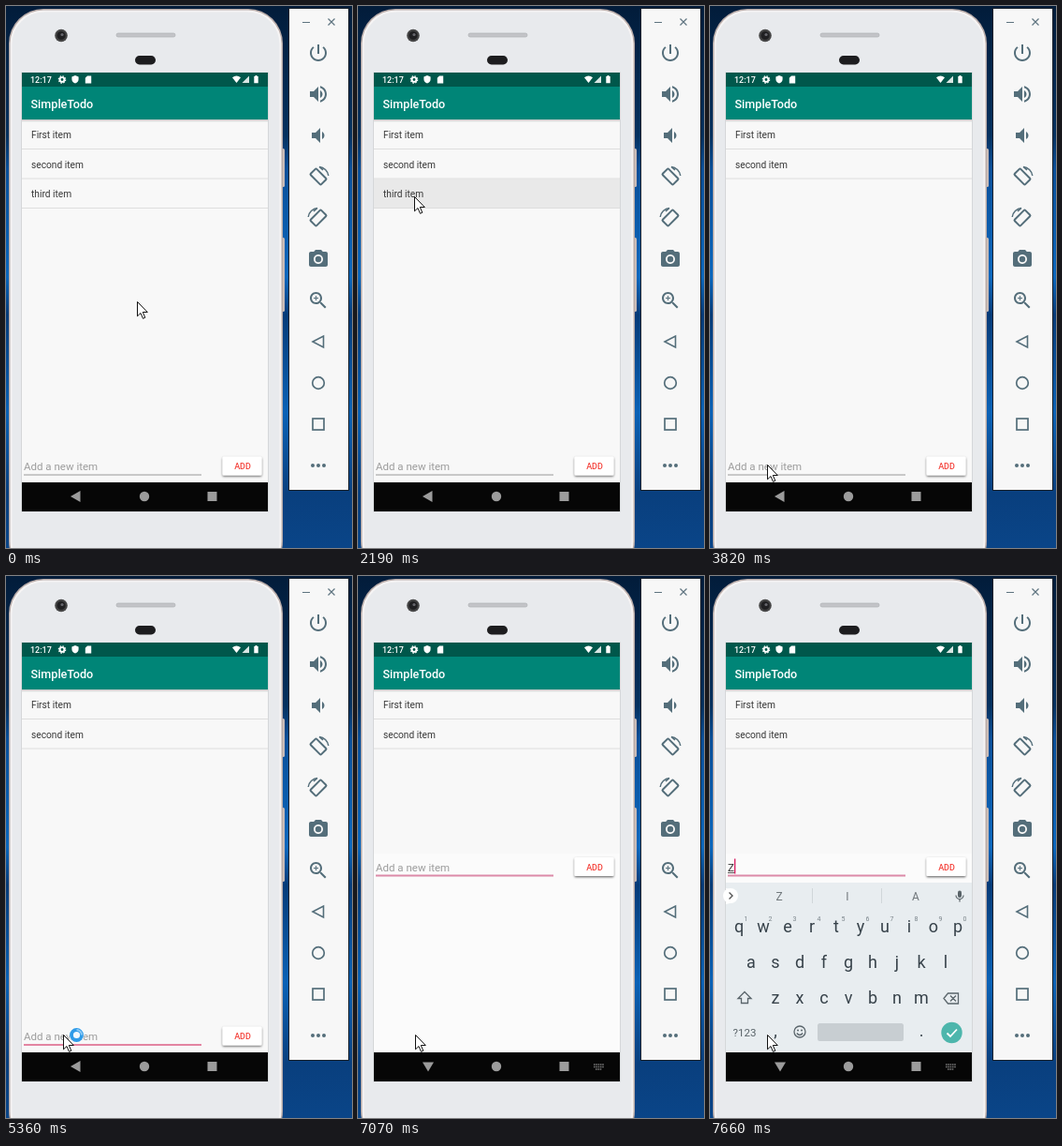
An HTML page for the animation above (8000 ms loop, 370x578 px).

```html
<!DOCTYPE html>
<html lang="en">
<head>
<meta charset="utf-8">
<title>Todo list demo</title>
<style>
  html, body { margin: 0; width: 100%; height: 100%; overflow: hidden; background: #06284f; }
  svg { display: block; width: 370px; height: 578px; }
  text { font-family: Roboto, "Noto Sans", sans-serif; }
  .item { font-size: 10.2px; fill: #383838; }
  .key { font-size: 18px; fill: #37424a; text-anchor: middle; }
  .num { font-size: 7px; fill: #7a848a; text-anchor: middle; }
  .word { font-size: 12px; fill: #72797d; text-anchor: middle; }
  .line { fill: none; stroke: #546e7a; stroke-width: 2; }
</style>
</head>
<body>
<svg viewBox="0 0 370 578">
  <defs>
    <linearGradient id="sky" x2="0" y2="1">
      <stop offset="0" stop-color="#021c3a"/>
      <stop offset=".24" stop-color="#05315f"/>
      <stop offset=".3" stop-color="#0a4f99"/>
      <stop offset=".5" stop-color="#0b67bd"/>
      <stop offset=".57" stop-color="#063b78"/>
      <stop offset=".75" stop-color="#0b62b6"/>
      <stop offset=".9" stop-color="#093f7e"/>
      <stop offset="1" stop-color="#0a4588"/>
    </linearGradient>
    <linearGradient id="drop" x2="0" y2="1">
      <stop offset="0" stop-color="#000" stop-opacity=".22"/>
      <stop offset="1" stop-color="#000" stop-opacity="0"/>
    </linearGradient>
    <filter id="soft" x="-20%" y="-30%" width="140%" height="170%">
      <feDropShadow dx="0" dy="1.2" stdDeviation="1.1" flood-color="#000" flood-opacity=".6"/>
    </filter>
  </defs>

  <rect width="370" height="578" fill="url(#sky)"/>

  <!-- phone -->
  <g>
    <rect x="294" y="152" width="4" height="41" rx="1.5" fill="#c9bcb8"/>
    <rect x="294" y="247" width="4" height="79" rx="1.5" fill="#c9bcb8"/>
    <rect x="3" y="3" width="293" height="605" rx="37" fill="#b9aca9"/>
    <rect x="4.5" y="4.5" width="290" height="602" rx="35.5" fill="#f6f4f4"/>
    <rect x="6.5" y="6.5" width="286" height="598" rx="34" fill="#e8eaed"/>
    <rect x="118" y="29" width="63" height="4" rx="2" fill="#c3c4c8" stroke="#aeb0b4" stroke-width=".7"/>
    <circle cx="59" cy="31.5" r="6.8" fill="#454545"/>
    <circle cx="59" cy="31.5" r="4.6" fill="#202022"/>
    <circle cx="60" cy="30.5" r="1.6" fill="#66666c"/>
    <rect x="138" y="53" width="22" height="9.5" rx="4.7" fill="#1d1d1f"/>
    <rect x="16" y="70.5" width="265" height="469" fill="#d5d7d9"/>
  </g>

  <!-- app -->
  <rect x="17" y="71" width="263" height="468" fill="#f8f8f8"/>
  <rect x="17" y="121" width="263" height="3" fill="url(#drop)"/>
  <rect x="17" y="71" width="263" height="15" fill="#00574b"/>
  <rect x="17" y="86" width="263" height="35" fill="#008577"/>
  <text x="26" y="82" font-size="9" font-weight="500" fill="#fff">12:17</text>
  <g fill="#fff">
    <circle cx="60" cy="78.5" r="2.4" fill="none" stroke="#fff" stroke-width="1.9"/>
    <circle cx="60" cy="78.5" r="3.7" fill="none" stroke="#fff" stroke-width="1.2" stroke-dasharray="1.5 1.4"/>
    <path d="M74 74l3.6 1.5v2.5q0 3.2-3.6 4.6q-3.6-1.4-3.6-4.6v-2.5z"/>
    <path d="M87 74.5h4.2v8h-6.4v-5.8z"/>
    <path d="M242 76.2q4.5-3.5 9 0l-4.5 5.8z"/>
    <path d="M260 74.5v7.5h-7.5z" opacity=".85"/>
    <path d="M266.5 74h2v1h1.2v7.3h-4.4v-7.3h1.2z"/>
  </g>
  <text x="26.5" y="108.5" font-size="12.6" font-weight="500" fill="#fff">SimpleTodo</text>

  <rect id="press" x="17" y="184.5" width="263" height="31" fill="#e9e9e9"/>
  <text class="item" x="27" y="141">First item</text>
  <text class="item" x="27" y="172.5">second item</text>
  <text class="item" id="third" x="27" y="204">third item</text>
  <path d="M17 152.5h263M17 184h263" stroke="#dedede"/>
  <path id="rule" d="M17 215.5h263" stroke="#dedede"/>

  <rect id="room" x="17" y="296" width="263" height="212" fill="#fbfbfb"/>
  <g id="entry">
    <text id="hint" x="19" y="495" font-size="11.5" fill="#9c9c9c">Add a new item</text>
    <g id="typed">
      <text x="19" y="495" font-size="11.5" fill="#333">Z</text>
      <path d="M19 497h7" stroke="#444" stroke-width=".9"/>
    </g>
    <path id="under" d="M19 500h190"/>
    <rect id="caret" y="482" width="1.3" height="16" fill="#d81b60"/>
    <rect x="231.5" y="480.5" width="42" height="20" rx="1.5" fill="#fff" filter="url(#soft)"/>
    <text x="253" y="494" font-size="9" font-weight="500" fill="#f4433c" text-anchor="middle">ADD</text>
  </g>

  <rect x="17" y="508" width="263" height="31" fill="#060606"/>
  <g fill="#9b9b9b">
    <path id="back" d="M69 523l10.5-6v12z"/>
    <path id="hide" d="M69 518.5h12l-6 10z"/>
    <circle cx="148" cy="523" r="5.2"/>
    <rect x="215.5" y="518" width="10" height="10"/>
    <path id="ime" d="M252 521h11M252 523.5h11M254 526h7" stroke="#777" stroke-width="1.4" stroke-dasharray="1.6 .7"/>
  </g>

  <g id="board"></g>

  <!-- emulator panel -->
  <rect x="302.5" y="2.5" width="64" height="514" fill="#f7f7f7" stroke="#16202a"/>
  <path d="M317 17.5h8M344.500 13.500l7 7m0-7l-7 7" stroke="#5f7480" stroke-width="1.2"/>
  <g id="tools" fill="#546e7a"></g>

  <g id="busy">
    <circle r="8.2" fill="#fff" opacity=".55"/>
    <circle r="5.5" fill="#f2f8fd" stroke="#2f9be8" stroke-width="3.8"/>
    <path d="M0-5.500A5.500 5.500 0 0 1 5.500 0" fill="none" stroke="#8fcaf5" stroke-width="2"/>
  </g>
  <path id="mouse" d="M.5 .5V15.800L4 12.500L6.500 18.300L8.800 17.300L6.300 11.500H11.300Z" fill="#fff" stroke="#111"/>
</svg>

<script>
const $ = id => document.getElementById(id);
const LOOP = 8000;

// Toolbar icons, each in a 24px box, spaced 44px apart
const cross = '<path d="M12 10h-2v2H9v-2H7V9h2V7h1v2h2v1z"/>';
const turn = flip => `<g class="line" transform="translate(12 12) scale(${flip} 1)">
  <rect x="-4.500" y="-8" width="9" height="16" rx="1" transform="rotate(-45)"/>
  <path d="M1-10.500A11 11 0 0 1 10.800-1M1-10.500l4 3.500" stroke-width="1.5"/></g>`;
const path = d => `<path d="${d}"/>`;
const icons = [
  path('M13 3h-2v10h2V3zm4.83 2.17l-1.42 1.42C17.99 7.86 19 9.81 19 12c0 3.87-3.13 7-7 7s-7-3.13-7-7c0-2.19 1.01-4.14 2.58-5.42L6.17 5.17C4.23 6.82 3 9.26 3 12c0 4.97 4.03 9 9 9s9-4.03 9-9c0-2.74-1.23-5.18-3.17-6.83z'),
  path('M3 9v6h4l5 5V4L7 9H3zm13.5 3c0-1.77-1.02-3.29-2.5-4.03v8.05c1.48-.73 2.5-2.25 2.5-4.02zM14 3.23v2.06c2.89.86 5 3.54 5 6.71s-2.11 5.85-5 6.71v2.06c4.01-.91 7-4.49 7-8.77s-2.99-7.86-7-8.77z'),
  path('M18.5 12c0-1.77-1.02-3.29-2.5-4.03v8.05c1.48-.73 2.5-2.25 2.5-4.02zM5 9v6h4l5 5V4L9 9H5z'),
  turn(1),
  turn(-1),
  path('M9 2L7.17 4H4c-1.1 0-2 .9-2 2v12c0 1.1.9 2 2 2h16c1.1 0 2-.9 2-2V6c0-1.1-.9-2-2-2h-3.17L15 2H9zm3 15c-2.76 0-5-2.24-5-5s2.24-5 5-5 5 2.24 5 5-2.24 5-5 5z') + '<circle cx="12" cy="12" r="3.2"/>',
  path('M15.5 14h-.79l-.28-.27C15.41 12.59 16 11.11 16 9.5 16 5.91 13.09 3 9.5 3S3 5.91 3 9.5 5.91 16 9.5 16c1.61 0 3.09-.59 4.23-1.57l.27.28v.79l5 4.99L20.49 19l-4.99-5zm-6 0C7.01 14 5 11.99 5 9.5S7.01 5 9.5 5 14 7.01 14 9.5 11.99 14 9.5 14z') + cross,
  '<path class="line" d="M6 12L17.500 6v12z" style="stroke-width:1.6"/>',
  '<circle class="line" cx="12" cy="12" r="6.3" style="stroke-width:1.7"/>',
  '<rect class="line" x="6" y="6" width="12" height="12" style="stroke-width:1.7"/>',
  [6, 12, 18].map(x => `<circle cx="${x}" cy="12" r="2"/>`).join('')
];
$('tools').innerHTML = icons
  .map((icon, i) => `<g transform="translate(322 ${38 + 44 * i})">${icon}</g>`).join('');

// Keyboard
const label = (cls, x, y, s) => `<text class="${cls}" x="${x}" y="${y}">${s}</text>`;
const row = (keys, x, y) => [...keys].map((k, i) => label('key', x + 26 * i, y, k)).join('');
$('board').innerHTML = `
  <rect x="17" y="327" width="263" height="181" fill="#e8edf0"/>
  <path d="M17 333a8.500 8.500 0 0 1 0 17z" fill="#fff"/>
  <circle cx="22" cy="341" r="8" fill="#fff"/>
  <path d="M20.500 337.500l3.500 3.500l-3.500 3.500" fill="none" stroke="#555" stroke-width="1.4"/>
  <path d="M109.500 333v16M183.500 333v16" stroke="#d0d6d9"/>
  <g id="words">${['Z', 'I', 'A'].map((s, i) => label('word', 74 + 73 * i, 346, s)).join('')}</g>
  <rect x="265" y="335.500" width="4" height="7.500" rx="2" fill="#596368"/>
  <path d="M263 340.500a4 4 0 0 0 8 0M267 344.500v3" fill="none" stroke="#596368" stroke-width="1.2"/>
  ${row('qwertyuiop', 31, 380)}
  ${[...'1234567890'].map((n, i) => label('num', 38.5 + 26 * i, 368, n)).join('')}
  ${row('asdfghjkl', 44, 418)}
  ${row('zxcvbnm', 70, 456)}
  <g fill="none" stroke="#5a656b" stroke-width="1.3">
    <path d="M37 443.500l7 7h-3.500v5h-7v-5h-3.500z"/>
    <path d="M250 450.500l4.500-5.500h11v11h-11zM257 447.500l6 6m0-6l-6 6"/>
    <circle cx="96" cy="486" r="6"/>
    <path d="M92.800 487.500q3.200 4 6.400 0"/>
  </g>
  <circle cx="94" cy="484.500" r="1" fill="#5a656b"/><circle cx="98" cy="484.500" r="1" fill="#5a656b"/>
  <text x="37" y="490.500" font-size="11.5" fill="#596368" text-anchor="middle">?123</text>
  ${label('key', 70, 491, ',')}${label('key', 226, 491, '.')}
  <rect x="115" y="477" width="92" height="19" rx="2.500" fill="#c8ced2"/>
  <circle cx="258.500" cy="487" r="11.200" fill="#4db6ac"/>
  <path d="M253.500 487.500l3.500 3.500l7-7.500" fill="none" stroke="#fff" stroke-width="1.8"/>`;

// Pointer stops: time, x, y
const stops = [
  [0, 140, 315], [530, 117, 273], [650, 94, 231], [930, 91, 224], [1070, 66, 204],
  [1220, 60, 203], [3160, 55, 464], [3320, 53, 506], [3460, 55, 502], [3580, 57, 498],
  [3700, 59, 493], [3820, 61, 489]
];
const blinks = [[4470, 4930], [5490, 5990], [6420, 6950], [7660, LOOP]];

const show = (id, on) => $(id).style.display = on ? '' : 'none';
const set = (id, name, value) => $(id).setAttribute(name, value);
const move = (id, x, y, turn = 0) => set(id, 'transform', `translate(${x} ${y}) rotate(${turn})`);

function draw(t) {
  const within = (a, b = LOOP) => t >= a && t < b;
  const [, x, y] = stops.findLast(s => t >= s[0]);
  move('mouse', x, y);

  show('press', within(2190, 2490));
  show('third', t < 2490);
  show('rule', t < 2490);
  set('third', 'opacity', t < 2340 ? 1 : .75);

  const focused = t >= 4470, raised = t >= 6950, typed = t >= 7660;
  set('under', 'stroke', raised ? '#dc8aa8' : focused ? '#dc5f86' : '#989898');
  set('under', 'stroke-width', raised ? 1.9 : focused ? 1.5 : 1);
  move('entry', 0, raised ? -180.5 : 0);
  show('room', raised);
  show('hint', !typed);
  show('typed', typed);
  set('hint', 'opacity', within(4470, 4620) ? .85 : 1);
  show('caret', blinks.some(b => within(...b)));
  set('caret', 'x', typed ? 26 : 19.5);

  show('busy', within(5360, 6140));
  move('busy', 75.5, 489.5, t < 5490 ? 0 : 90);

  const open = t >= 6420;
  show('back', !open);
  show('hide', open);
  show('ime', open);
  show('board', t >= 7380);
  move('board', 0, t < 7530 ? 8.5 : 0);
  show('words', typed);
}

const start = performance.now();
function tick() {
  draw((performance.now() - start) % LOOP);
  requestAnimationFrame(tick);
}
tick();
</script>
</body>
</html>
```
